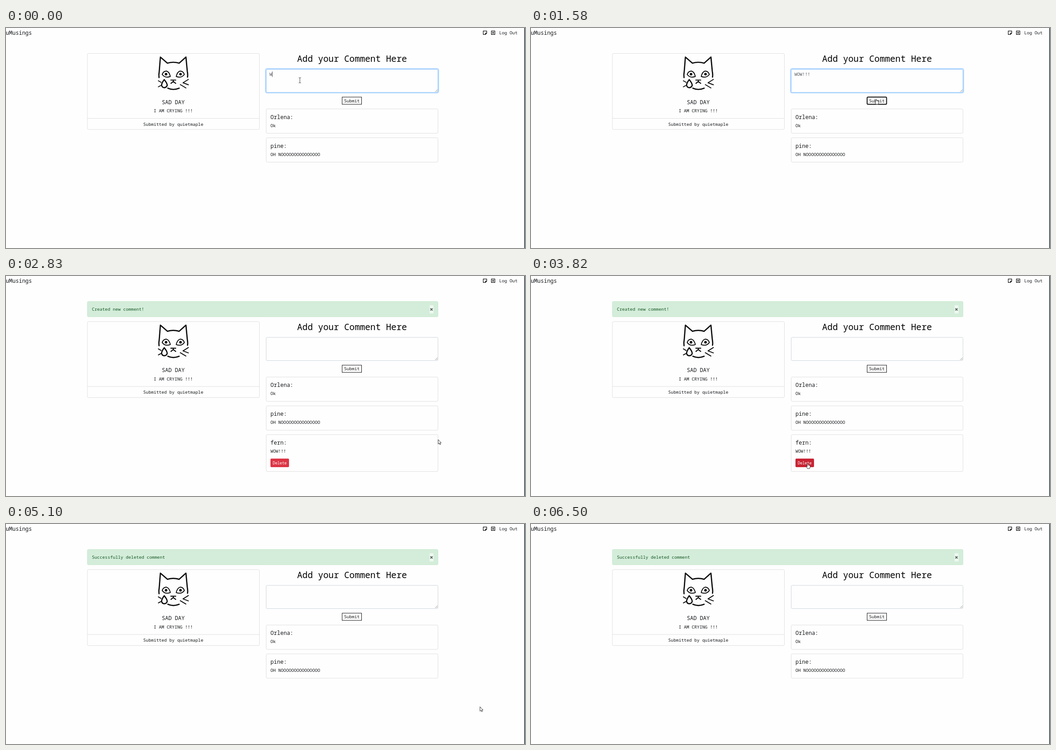
Write an HTML page that moves like this. It is 1148 px wide and 488 px high and loops after 6620 ms.

```html
<!DOCTYPE html>
<html lang="en">
<head>
<meta charset="utf-8">
<title>Comment page</title>
<style>
  html, body { margin: 0; width: 100%; height: 100%; overflow: hidden; background: #fefefe; }
  svg { display: block; width: 1148px; height: 488px; }
  text { font: 9.64px "Noto Sans Mono", "DejaVu Sans Mono", monospace; fill: #16181b; white-space: pre; }
  .mid { text-anchor: middle; }
  .title { font-size: 12.05px; }
  .heading { font-size: 19.28px; fill: #000; }
  .card { fill: none; stroke: #dfdfdf; }
  .ink { fill: none; stroke: #0c0c0c; stroke-linecap: round; stroke-linejoin: round; }
  .pointer { fill: #fff; stroke: #222; stroke-width: .9; stroke-linejoin: round; }
</style>
</head>
<body>
<svg viewBox="0 0 1148 488">
  <rect x="1146.4" width="2" height="488" fill="#2f3a47"/>
  <text class="title" x="-.5" y="15">uMusings</text>
  <g class="ink" stroke-width="1.2">
    <path d="M1055.6 6.6h7.8v5l-2.8 2.8h-5zM1063.4 11.4h-3v3"/>
    <path d="M1073.6 6.6h7.8v7.8h-7.8zM1075.5 10.5h4M1077.5 8.5v4"/>
  </g>
  <text x="1091" y="14">Log Out</text>

  <g id="alert">
    <rect x="180" y="56.5" width="775.5" height="34" rx="2.4" fill="#d4edda" stroke="#c9e8d0"/>
    <text id="notice" x="190" y="77.4" style="fill:#155724"></text>
    <rect x="937" y="65" width="8.5" height="18" fill="#eff8f1"/>
    <path d="M938.6 71.7l5 5m0-5l-5 5" stroke="#59635c" stroke-width="1.8"/>
  </g>

  <g id="page">
    <rect class="card" x="180" y="56.5" width="380.5" height="168.5" rx="2.4"/>
    <path class="card" d="M180 200.5h380.5"/>
    <g class="ink" stroke-width="2.7">
      <path d="M338.5 110Q337.5 104 339 96L341.5 64.5L357 78Q370 74 383 78L398 64.5L401 96Q402.5 104 401.5 109"/>
      <path d="M358 133.5Q370 139 383 133.5"/>
      <path d="M350 114.5Q343.5 123 344.3 127.5Q345.5 132 350 132.3Q355 132 356.5 127.5Q357 123 350 114.5z"/>
      <path d="M364.5 115.5h11M370 116v2.5M364.8 122.8L370 118.6L375.4 122.8" stroke-width="2.2"/>
      <path d="M337 117l6 3.5M337 130.5l5.5-3M403.5 114L391.5 121.5M391.5 121.5L403.5 126M385.5 125.5L398 133" stroke-width="1.9"/>
      <path d="M345.5 103Q348 95.5 355 95.5Q361 97 363.5 107.5Q352 112 345.5 103zM394.5 103Q392 95.5 385 95.5Q379 97 376.5 107.5Q388 112 394.5 103z" stroke-width="2"/>
      <g fill="#0c0c0c" stroke="none"><circle cx="354" cy="102.3" r="2.9"/><circle cx="386" cy="102.3" r="2.9"/></g>
    </g>
    <text class="title mid" x="370" y="168.8">SAD DAY</text>
    <text class="mid" x="370" y="187">I AM CRYING !!!</text>
    <text class="mid" x="370" y="216.6">Submitted by quietmaple</text>

    <text class="heading mid" x="765.4" y="75">Add your Comment Here</text>
    <rect id="ring" x="574" y="90" width="383" height="54" rx="3.5" fill="none" stroke="#bfdeff" stroke-width="2.2"/>
    <rect id="field" x="575.5" y="91.5" width="380" height="51.5" rx="2.4" fill="none"/>
    <path d="M949.5 141.5l5-5M952.5 141.5l2-2" stroke="#777" stroke-width=".8"/>
    <text id="typed" x="582.8" y="106" style="fill:#495057"></text>
    <path id="caret" d="M0 96.5v12" stroke="#333" stroke-width=".9"/>
    <g id="valid">
      <path d="M939.5 102.8l3.2 3.2l6-6.5" fill="none" stroke="#28a745" stroke-width="2.2"/>
      <text class="mid" x="765" y="155" style="font-size:8.26px;fill:#28a745">Looks good!</text>
    </g>
    <g id="lower">
      <rect id="submit" x="743.5" y="153.2" width="43" height="16" fill="none" stroke="#111"/>
      <text class="mid" x="765" y="164.7">Submit</text>
      <g id="comments"></g>
      <g id="added">
        <rect id="delete" x="585" y="360.5" width="41" height="19" rx="2"/>
        <text class="mid" x="605.5" y="373.2" style="font-size:8.6px;fill:#fff">Delete</text>
      </g>
    </g>
  </g>

  <g id="cursor">
    <path id="beam" d="M-2.5-6Q0-6 0-4.5Q0-6 2.5-6M0-4.5v9M-2.5 6Q0 6 0 4.5Q0 6 2.5 6" fill="none" stroke="#333" stroke-width=".9"/>
    <path id="arrow" class="pointer" d="M.4.4V10.2L2.7 8.2L4.3 11.6L5.8 10.9L4.3 7.6H7.2z"/>
    <path id="hand" class="pointer" d="M-1 6V1Q0-.5 1 1V4Q2 3.2 2.8 4.4Q3.8 3.8 4.3 4.9Q5.3 4.6 5.4 6V8.5Q5 10 4.3 11.7H-.6Q-1.5 9.5-3 7.2Q-2.7 5.6-1 7.4z"/>
  </g>
</svg>
<script>
const LOOP = 6620, SUBMITTED = 1720, CREATED = 2830, DELETED = 5100;
const $ = id => document.getElementById(id);
const show = (id, on) => $(id).setAttribute('display', on ? 'inline' : 'none');
const set = (id, attrs) => { for (const k in attrs) $(id).setAttribute(k, attrs[k]); };
const shift = (id, y) => set(id, { transform: `translate(0 ${y})` });

const card = (y, height, name, text) =>
  `<rect class="card" x="575.5" y="${y}" width="380" height="${height}" rx="2.4"/>
   <text class="title" x="585" y="${y + 22.2}">${name}:</text>
   <text x="585" y="${y + 40.2}">${text}</text>`;
$('comments').innerHTML = card(179.5, 54, 'Orlena', 'Ok') + card(243.5, 54, 'pine', 'OH N' + 'O'.repeat(15));
$('added').insertAdjacentHTML('afterbegin', card(307.3, 81.7, 'fern', 'WOW!!!'));

const keyTimes = [0, 140, 260, 570, 720, 845];
// Pointer steps: time, shape, x, y
const pointer = [
  [0, 'beam', 650, 116], [970, 'beam', 699.5, 132], [1120, 'arrow', 755, 143], [1270, 'arrow', 760.5, 167],
  [1420, 'hand', 763.5, 161], [1580, 'hand', 763.5, 157.5], [1720, 'arrow', 860, 270], [1850, 'arrow', 953, 361],
  [1990, 'arrow', 955.5, 362.5], [3110, 'arrow', 885, 395], [3240, 'arrow', 809, 421], [3380, 'arrow', 722, 436],
  [3510, 'arrow', 636, 423], [3670, 'hand', 609, 416], [3820, 'hand', 612, 415.5], [3980, 'arrow', 627, 419],
  [4120, 'arrow', 1048, 405], [5380, 'arrow', 1049.5, 407.5], [5520, 'arrow', 1067, 438], [5650, 'arrow', 1088, 473],
  [5790, 'none', 0, 0]
];

function draw(t) {
  const created = t >= CREATED, focused = t < SUBMITTED, valid = !focused && !created;
  const pressed = t >= 1580 && !created;

  show('alert', created);
  $('notice').textContent = t < DELETED ? 'Created new comment!' : 'Successfully deleted comment';
  shift('page', created ? 44.6 : 0);
  shift('lower', valid ? 15 : 0);

  const count = keyTimes.filter(k => k <= t).length;
  $('typed').textContent = created ? '' : 'WOW!!!'.slice(0, count);
  show('caret', t < 1420);
  set('caret', { transform: `translate(${583.3 + count * 5.784} 0)` });
  show('ring', focused);
  set('field', { stroke: focused ? '#80bdff' : valid ? '#28a745' : '#ced4da' });
  show('valid', valid);
  set('submit', { 'stroke-width': pressed ? 2 : 1, rx: pressed ? 2 : 0 });

  show('added', created && t < DELETED);
  set('delete', {
    fill: t < 3820 ? '#dc3545' : '#c82333',
    stroke: t < 3980 ? 'none' : '#f0a9b0',
    'stroke-width': 3.8, 'paint-order': 'stroke'
  });

  const [, shape, x, y] = pointer.findLast(p => p[0] <= t);
  for (const id of ['beam', 'arrow', 'hand']) show(id, id === shape);
  set('cursor', { transform: `translate(${x} ${y})` });
}

const start = performance.now();
function tick() {
  draw((performance.now() - start) % LOOP);
  requestAnimationFrame(tick);
}
tick();
</script>
</body>
</html>
```
